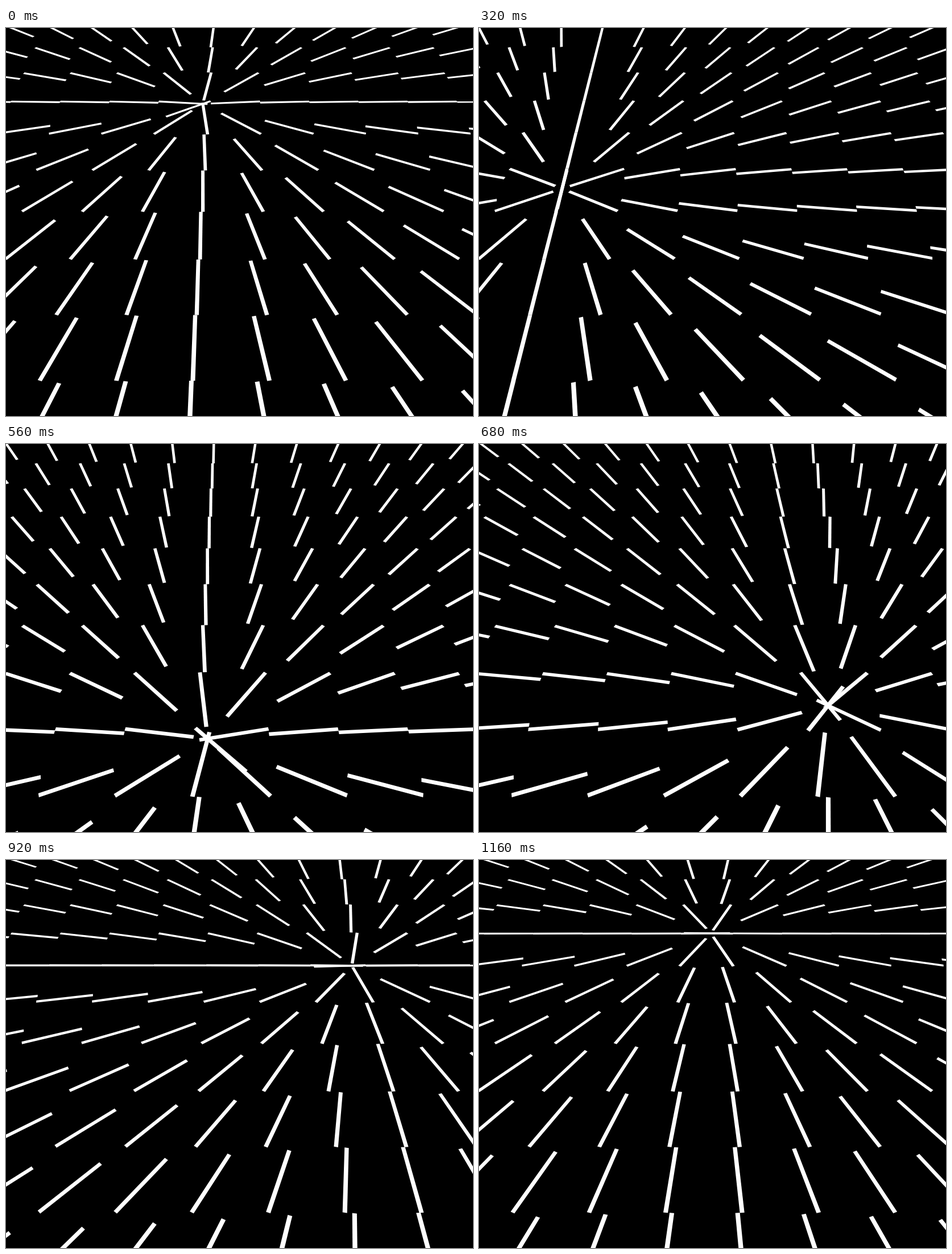
An HTML page with a canvas for the animation above (1200 ms loop, 821 px wide and 682 px high).

```html
<!DOCTYPE html>
<html lang="en">
<head>
<meta charset="utf-8">
<title>Lines facing a moving point</title>
<style>
  html, body { margin: 0; height: 100%; overflow: hidden; background: #000; }
  canvas { display: block; width: 100vw; height: 100vh; }
</style>
</head>
<body>
<canvas id="stage" width="821" height="682"></canvas>
<script>
const ctx = document.getElementById('stage').getContext('2d');
const W = 821, H = 682, TAU = Math.PI * 2;
const LOOP = 1200, STEP = 40;

// Tilted floor, measured in grid cells: u to the right, v away from the viewer.
const MID_X = 410.5, HORIZON = -766, DROP = 1382.2, PITCH = 133.6, DEPTH = 0.09064;
const OFFSET = 0.387;
// Each bar is one cell long and turns about a point just inside its tail.
const HALF = 0.03, TAIL = -HALF, TIP = 1 - HALF;

function project(u, v) {
  const s = 1 / (1 + DEPTH * v);
  return [MID_X + PITCH * u * s, HORIZON + DROP * s];
}

function unproject(x, y) {
  const s = (y - HORIZON) / DROP;
  return [(x - MID_X) / (PITCH * s), (1 / s - 1) / DEPTH];
}

// The point orbits on the floor at an uneven pace; the loop cuts a little short of a full turn.
const ORBIT = 1240, CENTER = [0.03, 3.43];
let last = 0;
const orbit = [
  [0, 346, 133.3], [200, 209, 189.8], [400, 149, 368.5], [560, 354.6, 517.8],
  [800, 682.8, 293.5], [1000, 537, 148.3], [1160, 407.7, 128.9]
].map(([t, x, y]) => {
  const [u, v] = unproject(x, y);
  const du = u - CENTER[0], dv = v - CENTER[1];
  let angle = Math.atan2(-du, dv);
  while (angle < last) angle += TAU;
  last = angle;
  return [t, angle, Math.hypot(du, dv)];
});

function knot(i) {
  const n = orbit.length, turn = Math.floor(i / n);
  const [t, angle, radius] = orbit[i - turn * n];
  return [t + turn * ORBIT, angle + turn * TAU, radius];
}

function tangent(i, k) {
  const a = knot(i - 1), b = knot(i), c = knot(i + 1);
  const h0 = b[0] - a[0], h1 = c[0] - b[0];
  return ((b[k] - a[k]) / h0 * h1 + (c[k] - b[k]) / h1 * h0) / (h0 + h1);
}

function smooth(t, k) {
  let i = 0;
  while (knot(i + 1)[0] <= t) i++;
  const a = knot(i), b = knot(i + 1), h = b[0] - a[0], p = (t - a[0]) / h;
  const q = p * p * (3 - 2 * p);
  return a[k] + (b[k] - a[k]) * q
    + h * p * (1 - p) * ((1 - p) * tangent(i, k) - p * tangent(i + 1, k));
}

function drawBar(u, v, aim) {
  const a = Math.atan2(aim[1] - v, aim[0] - u);
  const c = Math.cos(a), s = Math.sin(a);
  const corner = (along, across) =>
    ctx.lineTo(...project(u + c * along - s * across, v + s * along + c * across));
  ctx.beginPath();
  corner(TAIL, -HALF);
  corner(TIP, -HALF);
  corner(TIP, HALF);
  corner(TAIL, HALF);
  ctx.fill();
}

function draw(t) {
  const angle = smooth(t, 1), radius = smooth(t, 2);
  const aim = [CENTER[0] - radius * Math.sin(angle), CENTER[1] + radius * Math.cos(angle)];
  ctx.fillStyle = '#000';
  ctx.fillRect(0, 0, W, H);
  ctx.fillStyle = '#fff';
  for (let row = -1; row <= 10; row++)
    for (let col = -8; col <= 7; col++) drawBar(col + OFFSET, row, aim);
}

function frame() {
  draw(Math.floor(performance.now() % LOOP / STEP) * STEP);
  requestAnimationFrame(frame);
}
frame();
</script>
</body>
</html>
```
